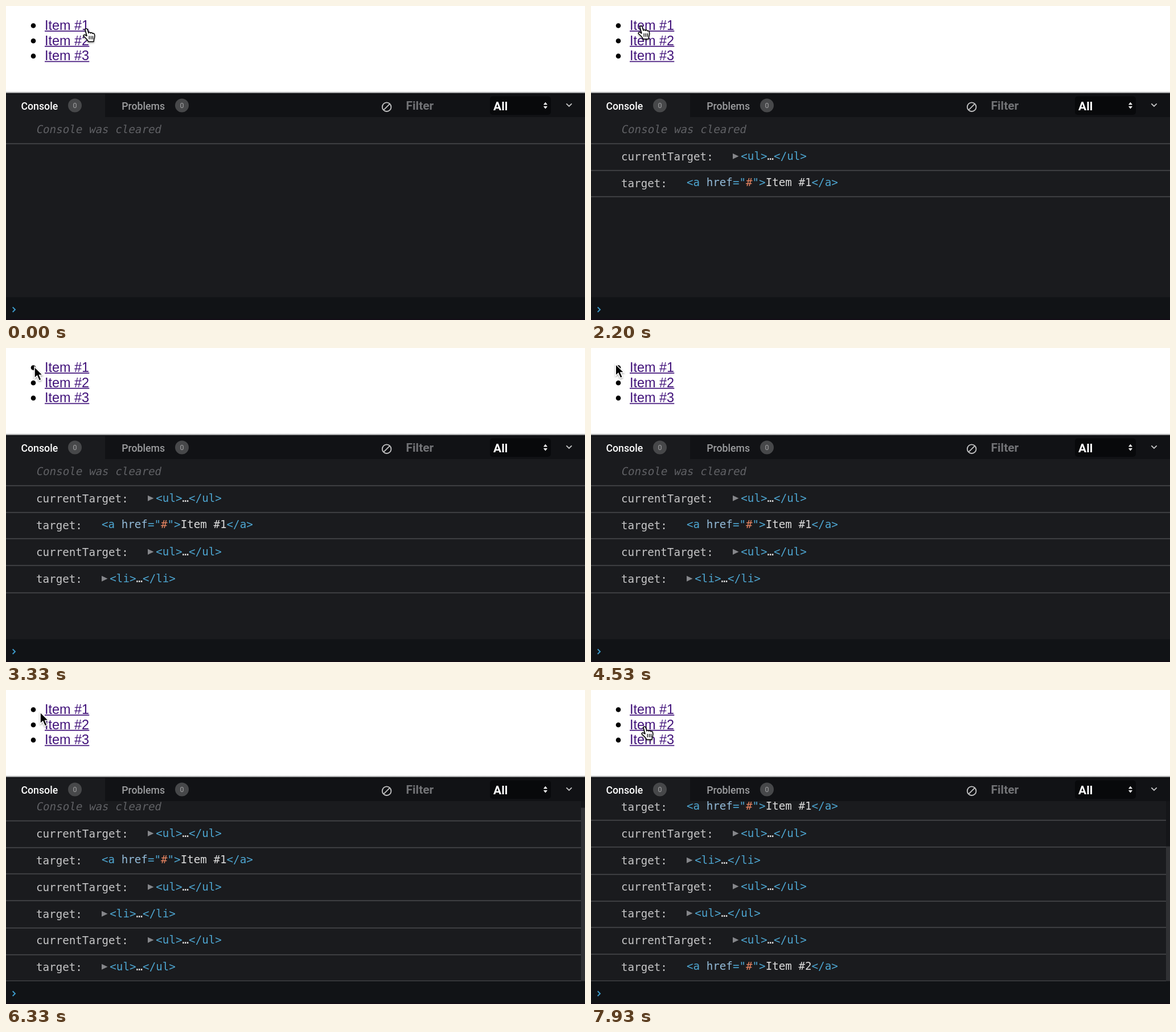
Recreate the animation shown at these times as an HTML page. Size 1017 by 551 pixels, loop 8 s.

```html
<!DOCTYPE html>
<html lang="en">
<head>
<meta charset="utf-8">
<title>Event delegation console</title>
<style>
  html, body { margin: 0; width: 100%; height: 100%; overflow: hidden; background: #1a1b1e; }
  svg { display: block; }
  text { white-space: pre; }
  .link { font: 23.4px "Liberation Sans", Arial, sans-serif; fill: #41127a; }
  .ui { font: 500 17.7px Roboto, sans-serif; }
  .bold { font: 700 21px Roboto, sans-serif; }
  .badge { font: 12.5px Roboto, sans-serif; fill: #a2a2a4; text-anchor: middle; }
  .mono { font: 19.2px "DejaVu Sans Mono", monospace; }
  .label { fill: #c6c6c7; }
  .tag { fill: #4da5d0; }
  .attr { fill: #94bcda; }
  .value { fill: #e58461; }
  .plain { fill: #dcdcdc; }
</style>
</head>
<body>
<svg id="stage" width="100%" height="100%" viewBox="0 0 1017 551">
  <defs>
    <linearGradient id="edge" x2="0" y2="1">
      <stop stop-color="#fff"/><stop offset="1" stop-color="#77787a"/>
    </linearGradient>
    <filter id="shadow" x="-50%" y="-50%" width="200%" height="200%">
      <feDropShadow dx="0" dy="1.5" stdDeviation="1.4" flood-opacity=".4"/>
    </filter>
  </defs>
  <rect width="1017" height="551" fill="#1a1b1e"/>
  <rect width="1017" height="152" fill="#fff"/>
  <rect y="150" width="1017" height="3" fill="url(#edge)"/>
  <g id="items"></g>

  <rect x="174" y="153" width="843" height="42" fill="#111215"/>
  <rect y="153" width="174" height="1.5" fill="#111215"/>
  <text class="ui" x="26.5" y="181.5" fill="#fff">Console</text>
  <text class="ui" x="203.3" y="181.5" fill="#9b9c9e">Problems</text>
  <g fill="#47484a"><circle cx="121" cy="174.5" r="12"/><circle cx="309" cy="174.5" r="12"/></g>
  <text class="badge" x="121" y="179">0</text>
  <text class="badge" x="309" y="179">0</text>
  <g fill="none" stroke="#c4c4c5" stroke-width="1.8">
    <circle cx="668.7" cy="177.2" r="7.8"/>
    <path d="M663.2 182.7 674.2 171.7"/>
    <path d="M984.3 171.3 989 176 993.7 171.3"/>
  </g>
  <text class="bold" x="702.5" y="182" fill="#717275">Filter</text>
  <rect x="850" y="158.5" width="107" height="32.5" rx="5" fill="#08090b"/>
  <text class="bold" x="856" y="183" fill="#fff">All</text>
  <path d="M944 173.3 947.5 168.8 951 173.3ZM944 176 947.5 180.5 951 176Z" fill="#fff"/>

  <svg y="195" width="1017" height="316" viewBox="0 195 1017 316" overflow="hidden">
    <g id="log">
      <text class="mono" transform="translate(52.5 223) skewX(-11)" fill="#606165">Console was cleared</text>
    </g>
    <g id="scrollbar">
      <rect x="1010" y="195" width="7" height="316" fill="#151619"/>
      <rect id="thumb" x="1010" width="7" fill="#303134"/>
    </g>
  </svg>

  <rect y="511" width="1017" height="40" fill="#111316"/>
  <rect y="549" width="1017" height="2" fill="#140d17"/>
  <path d="M11.7 528.5 16 532.7 11.7 537" fill="none" stroke="#3d9bcb" stroke-width="1.9"/>

  <g id="arrow" filter="url(#shadow)">
    <path d="M0 0V20L4.6 15.8 8.2 24.2 12 22.6 8.5 14.4H14.5Z" fill="#000" stroke="#fff" stroke-width="1.4"/>
  </g>
  <g id="hand" filter="url(#shadow)">
    <path transform="translate(-6 -1)" d="M4 3C4 .5 7.4 .5 8.2 3L10 9C10 7.4 13 7 13.6 9.2 14 7.8 16.7 8 17 10 17.6 9 20 9.4 20.4 11.5 21.3 15 20.4 17 19.6 19.5L19 24H9.5C9 21 5 18 1.5 14.5 .4 12.5 2.5 11.3 4.5 12.5L7 14Z" fill="#fff" stroke="#000" stroke-width="1.5" stroke-linejoin="round"/>
    <path d="M5.2 13V19M8.4 13V19M11.4 13V19" stroke="#000" stroke-width="1.3"/>
  </g>
</svg>
<script>
const LOOP = 8000, VIEW_TOP = 195, VIEW_HEIGHT = 316;
const CLICKS = [600, 3000, 5330, 7670];
const SCROLL = [0, 0, 0, 12, 106];
const LINES = [241, 288, 334, 381, 429, 476, 522, 569, 616];
// Pointer hotspot: time, x, y
const PATH = [
  [0, 141, 39.5], [70, 141, 39.5], [470, 131, 38],
  [1530, 131, 38], [1800, 118, 37], [2200, 88, 35], [2400, 75, 33],
  [2560, 60, 31], [2800, 50, 33],
  [4470, 50, 33], [4670, 28, 18], [4870, 14, 15], [5070, 23, 27], [5270, 36, 35],
  [6000, 36, 35], [6160, 43, 36], [6330, 60, 39], [6470, 82, 54], [6600, 94, 64],
  [LOOP, 94, 64]
];
const $ = id => document.getElementById(id);
const span = (kind, text) =>
  `<tspan class="${kind}">${text.replace(/</g, '&lt;').replace(/>/g, '&gt;')}</tspan>`;
const element = name => span('tag', `<${name}>`) + span('plain', '…') + span('tag', `</${name}>`);
const anchor = n => span('tag', '<a ') + span('attr', 'href') + span('tag', '="') +
  span('value', '#') + span('tag', '">') + span('plain', `Item #${n}`) + span('tag', '</a>');

function logRow(index, label, x, markup, expandable) {
  const y = Math.round(271.2 + 46.8 * index);
  const triangle = expandable ? `<path d="M${x} ${y - 12.3}l10.5 5-10.5 5z" fill="#85868a"/>` : '';
  return `<g class="row"><text class="mono label" x="53" y="${y}">${label}</text>${triangle}
    <text class="mono" x="${x + (expandable ? 14.3 : 0)}" y="${y - (expandable ? 1 : 2)}">${markup}</text>
    ${separator(LINES[index + 1])}</g>`;
}
const separator = y => `<rect y="${y - .2}" width="1017" height="1.6" fill="#48494c"/>`;

$('items').innerHTML = [1, 2, 3].map(n => {
  const y = 42 + 26.7 * (n - 1);
  return `<circle cx="48" cy="${y - 7.5}" r="4.3"/>
    <text class="link" x="68" y="${y}">Item #${n}</text>
    <rect x="68" y="${y + 1.2}" width="78.3" height="1.7" fill="#41127a"/>`;
}).join('');

const targets = [anchor(1), element('li'), element('ul'), anchor(2)];
$('log').innerHTML += separator(LINES[0]) + targets.map((markup, i) =>
  logRow(2 * i, 'currentTarget:', 249, element('ul'), true) +
  logRow(2 * i + 1, 'target:', 168, markup, !markup.includes('href'))
).join('');
const rows = [...document.querySelectorAll('.row')];

function pointerAt(t) {
  const i = PATH.findIndex(key => key[0] > t);
  const [t0, x0, y0] = PATH[i - 1], [t1, x1, y1] = PATH[i];
  const k = (t - t0) / (t1 - t0);
  return [x0 + (x1 - x0) * k, y0 + (y1 - y0) * k];
}
const show = (node, visible) => node.setAttribute('display', visible ? 'inline' : 'none');

function draw(t) {
  const clicks = CLICKS.filter(time => t >= time).length;
  const scroll = SCROLL[clicks];
  rows.forEach((row, i) => show(row, i < 2 * clicks));
  $('log').setAttribute('transform', `translate(0 ${-scroll})`);

  const ratio = VIEW_HEIGHT / (VIEW_HEIGHT + scroll);
  show($('scrollbar'), scroll > 0);
  $('thumb').setAttribute('y', VIEW_TOP + scroll * ratio);
  $('thumb').setAttribute('height', VIEW_HEIGHT * ratio);

  const [x, y] = pointerAt(t);
  const overLink = x >= 68;
  for (const id of ['arrow', 'hand']) $(id).setAttribute('transform', `translate(${x} ${y})`);
  show($('hand'), overLink);
  show($('arrow'), !overLink);
}

const start = performance.now();
function tick() {
  draw((performance.now() - start) % LOOP);
  requestAnimationFrame(tick);
}
tick();
</script>
</body>
</html>
```
